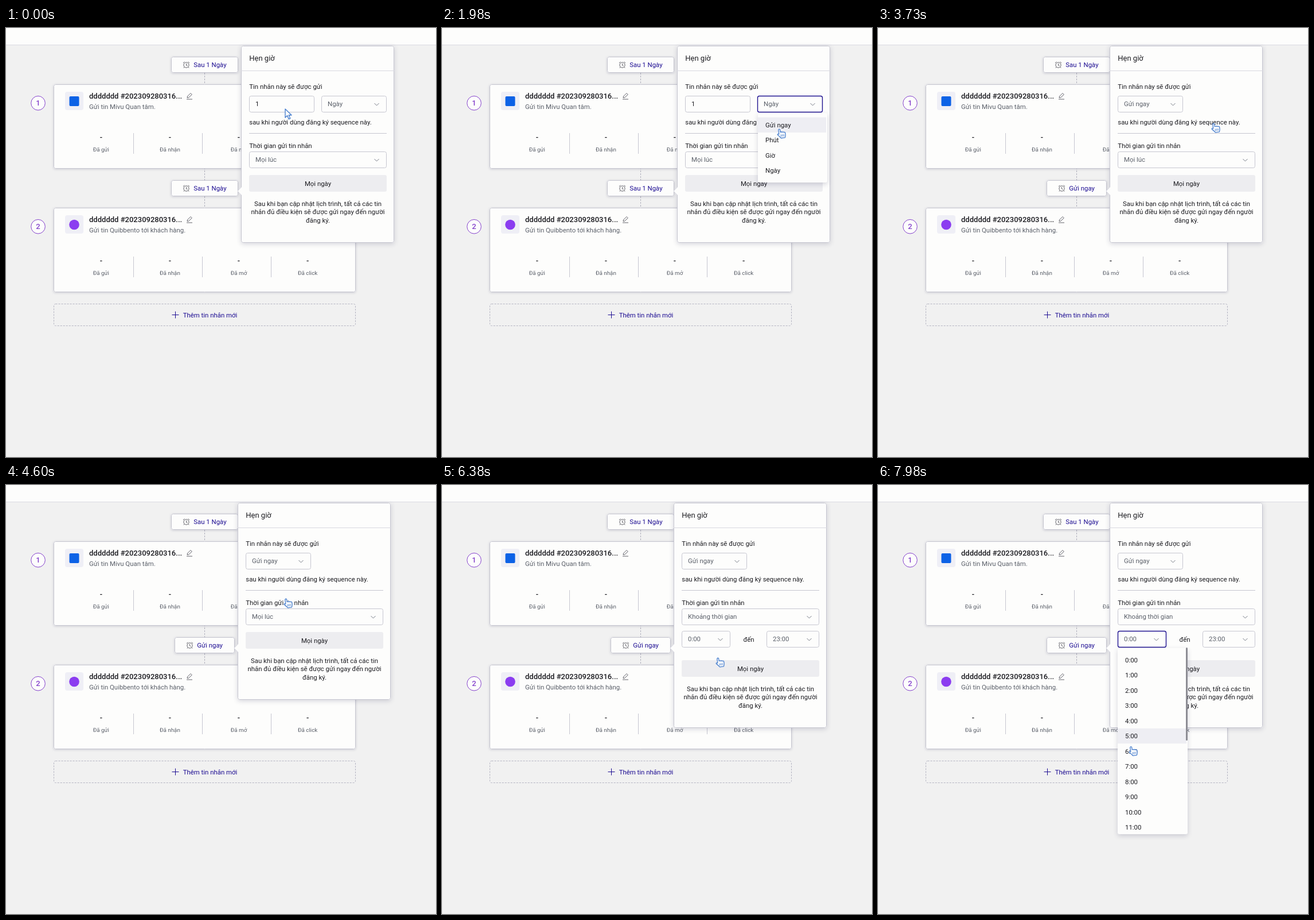
These frames come from a looping animation (750 px wide and 747 px high, 8 s). An HTML page with a canvas:

```html
<!DOCTYPE html>
<html lang="vi">
<head>
<meta charset="utf-8">
<title>Hẹn giờ</title>
<style>
html, body { margin: 0; width: 100%; height: 100%; overflow: hidden; background: #f1f1f1; }
canvas { display: block; width: 750px; height: 747px; }
</style>
</head>
<body>
<canvas id="stage"></canvas>
<script>
const W = 750, H = 747, LOOP = 8000;
const canvas = document.getElementById('stage');
const dpr = window.devicePixelRatio || 1;
canvas.width = W * dpr;
canvas.height = H * dpr;
const ctx = canvas.getContext('2d');

const C = {
  bg: '#f1f1f1', white: '#fdfdfc', line: '#d9d9e0', edge: '#c6c6d0', focus: '#1f1290',
  link: '#1c0c92', ink: '#1b1b20', soft: '#5a5f69', hover: '#eeeef3', purple: '#8440cc', cursor: '#4a80cf'
};
const BODY = 11.4, SMALL = 9.8, HEAD = 13;

// When each thing happens, in ms
const T = { unitFocus: 1030, unitOpen: 1090, unitPick: 3650, spanOpen: 4980, spanPick: 5960, hourHover: 6980, hourOpen: 7260 };

// Pointer tip: time, x, y
const PATH = [
  [0, 487, 141], [70, 487, 141], [850, 593, 121], [1400, 593, 121], [1850, 588, 166],
  [2450, 588, 247], [2800, 588, 247], [3150, 586, 227], [3320, 586, 227], [3580, 585, 166],
  [3930, 585, 166], [4600, 488, 198], [4900, 484, 224], [5150, 484, 224], [5600, 481, 301],
  [6420, 481, 301], [7050, 441, 271], [7400, 441, 271], [8200, 441, 497]
];

function pointerAt(t) {
  let i = 1;
  while (i < PATH.length - 1 && PATH[i][0] < t) i++;
  const a = PATH[i - 1], b = PATH[i];
  const p = Math.max(0, Math.min(1, (t - a[0]) / (b[0] - a[0])));
  const e = p * p * (3 - 2 * p);
  return { x: a[1] + (b[1] - a[1]) * e, y: a[2] + (b[2] - a[2]) * e };
}

function text(str, x, y, { size = BODY, color = C.ink, weight = 400, align = 'left' } = {}) {
  ctx.font = `${weight} ${size}px Roboto, sans-serif`;
  ctx.fillStyle = color;
  ctx.textAlign = align;
  ctx.fillText(str, x, y + size * 0.355);
}

function fill(x, y, w, h, color, r = 0) {
  ctx.fillStyle = color;
  ctx.beginPath();
  ctx.roundRect(x, y, w, h, r);
  ctx.fill();
}

function box(x, y, w, h, { bg = C.white, edge = C.edge, r = 3, blur = 0, dy = 1, width = 1 } = {}) {
  ctx.save();
  ctx.shadowColor = 'rgba(50,50,90,.2)';
  ctx.shadowBlur = blur * dpr;
  ctx.shadowOffsetY = blur ? dy * dpr : 0;
  if (bg) fill(x, y, w, h, bg, r);
  ctx.restore();
  if (!edge) return;
  ctx.strokeStyle = edge;
  ctx.lineWidth = width;
  ctx.beginPath();
  ctx.roundRect(x + .5, y + .5, w - 1, h - 1, r);
  ctx.stroke();
}

function line(points, color, width = 1, dash = []) {
  ctx.strokeStyle = color;
  ctx.lineWidth = width;
  ctx.setLineDash(dash);
  ctx.beginPath();
  points.forEach(([x, y], i) => i ? ctx.lineTo(x, y) : ctx.moveTo(x, y));
  ctx.stroke();
  ctx.setLineDash([]);
}

function disc(x, y, r, color, edge) {
  ctx.beginPath();
  ctx.arc(x, y, r, 0, 7);
  if (color) { ctx.fillStyle = color; ctx.fill(); }
  if (edge) { ctx.strokeStyle = edge; ctx.lineWidth = 1; ctx.stroke(); }
}

function clock(x, y) {
  disc(x, y + .5, 4.6, null, '#5c5c64');
  line([[x, y - 2], [x, y + 1], [x + 2, y + 2]], '#5c5c64');
  for (const s of [-1, 1]) {
    line([[x + s * 5.5, y - 3], [x + s * 3, y - 5.2]], '#5c5c64');
    line([[x + s * 3.5, y + 4], [x + s * 4.5, y + 5.5]], '#5c5c64');
  }
}

function pencil(x, y) {
  line([[x - 4, y + 3], [x - 3.5, y + .5], [x + 2, y - 5], [x + 4.3, y - 2.7], [x - 1.3, y + 2.7], [x - 4, y + 3]], '#62626a');
  line([[x - 5, y + 5.5], [x + 5, y + 5.5]], '#62626a');
}

function chip(x, y, w, label) {
  box(x, y, w, 28, { blur: 4 });
  clock(x + 26.5, y + 14);
  text(label, x + 39.3, y + 14, { color: C.link });
}

function card(y, h, num, note, drawMark) {
  disc(56, y + 32.8, 12.3, C.white, C.purple);
  text(num, 56, y + 32.8, { size: HEAD, color: C.purple, weight: 500, align: 'center' });
  box(83, y, 527, h, { blur: 4 });
  fill(103, y + 13, 32, 32, '#efeff6', 4);
  drawMark(119, y + 29.5);
  text('ddddddd #202309280316...', 145, y + 20.3, { size: HEAD, weight: 500 });
  pencil(320, y + 20.5);
  text(note, 145, y + 38.8, { color: C.soft });
  ['Đã gửi', 'Đã nhận', 'Đã mở', 'Đã click'].forEach((label, i) => {
    const x = 165.8 + i * 120.1;
    text('-', x, y + 92.5, { size: HEAD, weight: 500, align: 'center' });
    text(label, x, y + 113.2, { size: SMALL, color: C.soft, align: 'center' });
    if (i) line([[102.5 + i * 120, y + 85], [102.5 + i * 120, y + 121]], C.edge);
  });
}

function field(x, y, w, value, { focus, edge, select = true } = {}) {
  box(x, y, w, 29, { edge: focus ? C.focus : edge || C.edge, width: focus ? 1.4 : 1 });
  text(value, x + 11, y + 14.3, { color: select ? C.soft : C.ink });
  if (!select) return;
  const cx = x + w - 17.5;
  line([[cx - 4, y + 13], [cx, y + 17], [cx + 4, y + 13]], '#777c86');
}

function menu(x, y, w, h, rows, first, step, tip, age, chosen) {
  const p = Math.max(0, Math.min(1, age / 160));
  if (!p) return;
  ctx.save();
  ctx.globalAlpha = p;
  ctx.translate(0, y);
  ctx.scale(1, .8 + .2 * p);
  ctx.translate(0, -y);
  box(x, y, w, h, { edge: null, blur: 9, dy: 3 });
  const at = Math.floor((tip.y - first + step / 2) / step);
  const active = at >= 0 && at < rows.length ? at : chosen;
  fill(x, first + (active - .5) * step, w - 2, step, C.hover);
  rows.forEach((row, i) => text(row, x + 13, first + i * step));
  ctx.restore();
}

function panel(t) {
  const now = t >= T.unitPick, ranged = t >= T.spanPick;
  const x = now ? 404 : 410, l = x + 14, w = 240, mid = l + w / 2;
  const drop = ranged ? 49 : 0;
  const tip = pointerAt(t - 60);

  box(x, 31, 267, 343 + drop, { blur: 8, dy: 2 });
  ctx.fillStyle = C.white;
  ctx.beginPath();
  ctx.moveTo(x + 1, 277);
  ctx.lineTo(x - 6, 284);
  ctx.lineTo(x + 1, 291);
  ctx.fill();
  line([[x, 277.5], [x - 6, 284], [x, 290.5]], '#dedee7');

  text('Hẹn giờ', l + .3, 52.5, { size: HEAD });
  line([[x, 74.5], [x + 267, 74.5]], C.line);
  text('Tin nhắn này sẽ được gửi', l + .3, 102);
  const unitOpen = t >= T.unitOpen && !now;
  if (now) {
    field(l, 118, 114, 'Gửi ngay');
  } else {
    field(l, 118, 114, '1', { select: false });
    field(l + 126, 118, 114, 'Ngày', { focus: t >= T.unitFocus });
  }
  text('sau khi người dùng đăng ký sequence này.', l + .3, 164);
  line([[l, 183.5], [l + w, 183.5]], C.edge);

  const spanOpen = t >= T.spanOpen && !ranged;
  text('Thời gian gửi tin nhắn', l + .3, 204.5);
  field(l, 215, w, ranged ? 'Khoảng thời gian' : 'Mọi lúc', { focus: spanOpen });
  if (ranged) {
    field(l, 254, 85, '0:00', { focus: t >= T.hourOpen, edge: t >= T.hourHover ? '#dcd9ee' : null });
    text('đến', l + 117, 268.5, { align: 'center' });
    field(l + 148, 254, 92, '23:00');
  }

  fill(l, 256 + drop, w, 29, '#ededf0', 3);
  text('Mọi ngày', mid, 270.6 + drop, { align: 'center' });
  ['Sau khi bạn cập nhật lịch trình, tất cả các tin', 'nhắn đủ điều kiện sẽ được gửi ngay đến người', 'đăng ký.']
    .forEach((row, i) => text(row, mid, 305.6 + drop + i * 14.5, { align: 'center' }));

  if (unitOpen) {
    menu(551, 148, 121, 121, ['Gửi ngay', 'Phút', 'Giờ', 'Ngày'], 168.7, 26.4, tip, t - T.unitOpen, 3);
  }
  if (spanOpen) {
    menu(418, 246, 240, 67, ['Mọi lúc', 'Khoảng thời gian'], 266, 26.4, tip, t - T.spanOpen, 0);
  }
  if (t > T.hourOpen) {
    const hours = Array.from({ length: 12 }, (_, i) => i + ':00');
    menu(418, 284, 122, 324, hours, 304.6, 26.5, tip, t - T.hourOpen, 0);
    if (t > T.hourOpen + 160) fill(537, 283, 3, 162, '#8d8d94', 1.5);
  }
}

const ARROW = new Path2D('M0 0V15L3.6 11.6L6.2 17.6L8.8 16.5L6.2 10.7H11Z');
const HAND = new Path2D('M-1.5 9.5V1.5Q0 -1 1.5 1.5V6Q3.6 5 4.6 6.5Q6.6 5.5 7.6 7Q9.8 6.4 10.2 8.4V12Q10 14 8.8 17H1.5Q-.5 14-4.2 10.2Q-4.2 7.6-1.5 9.5Z');

function pointer(t) {
  const p = pointerAt(t), hand = p.x > 551 || t > 850;
  ctx.save();
  ctx.translate(p.x, p.y);
  if (hand) {
    ctx.rotate(-.13);
    ctx.scale(.95, .95);
  }
  const shape = hand ? HAND : ARROW;
  ctx.fillStyle = C.white;
  ctx.strokeStyle = C.cursor;
  ctx.lineWidth = 1.4;
  ctx.lineJoin = 'round';
  ctx.fill(shape);
  ctx.stroke(shape);
  if (hand) for (const x of [2, 4.5, 7]) line([[x, 10.5], [x, 14.5]], C.cursor);
  ctx.restore();
}

function draw(t) {
  ctx.setTransform(dpr, 0, 0, dpr, 0, 0);
  fill(0, 0, W, H, C.bg);
  fill(0, 0, W, 29, C.white);
  line([[0, 29.5], [W, 29.5]], '#dadae2');
  line([[346.5, 78], [346.5, 312]], '#b0b0bc', 1, [3, 2]);

  chip(288, 50, 117, 'Sau 1 Ngày');
  card(98, 147, '1', 'Gửi tin Mivu Quan tâm.', (x, y) => fill(x - 8.5, y - 8.5, 17, 17, '#0d62e6', 2));
  card(313, 147, '2', 'Gửi tin Quibbento tới khách hàng.', (x, y) => disc(x, y, 8.8, '#8b3df0'));
  if (t < T.unitPick) chip(288, 265, 117, 'Sau 1 Ngày');
  else chip(294, 265, 105, 'Gửi ngay');

  ctx.setLineDash([3, 2]);
  box(83, 480, 527, 39, { bg: null, edge: '#b4b4c2' });
  ctx.setLineDash([]);
  line([[289.5, 499.5], [301.5, 499.5]], C.link);
  line([[295.5, 493.5], [295.5, 505.5]], C.link);
  text('Thêm tin nhắn mới', 308.7, 499.5, { color: C.link });

  panel(t);
  pointer(t);
}

const start = performance.now();
function tick() {
  draw((performance.now() - start) % LOOP);
  requestAnimationFrame(tick);
}
tick();
</script>
</body>
</html>
```
